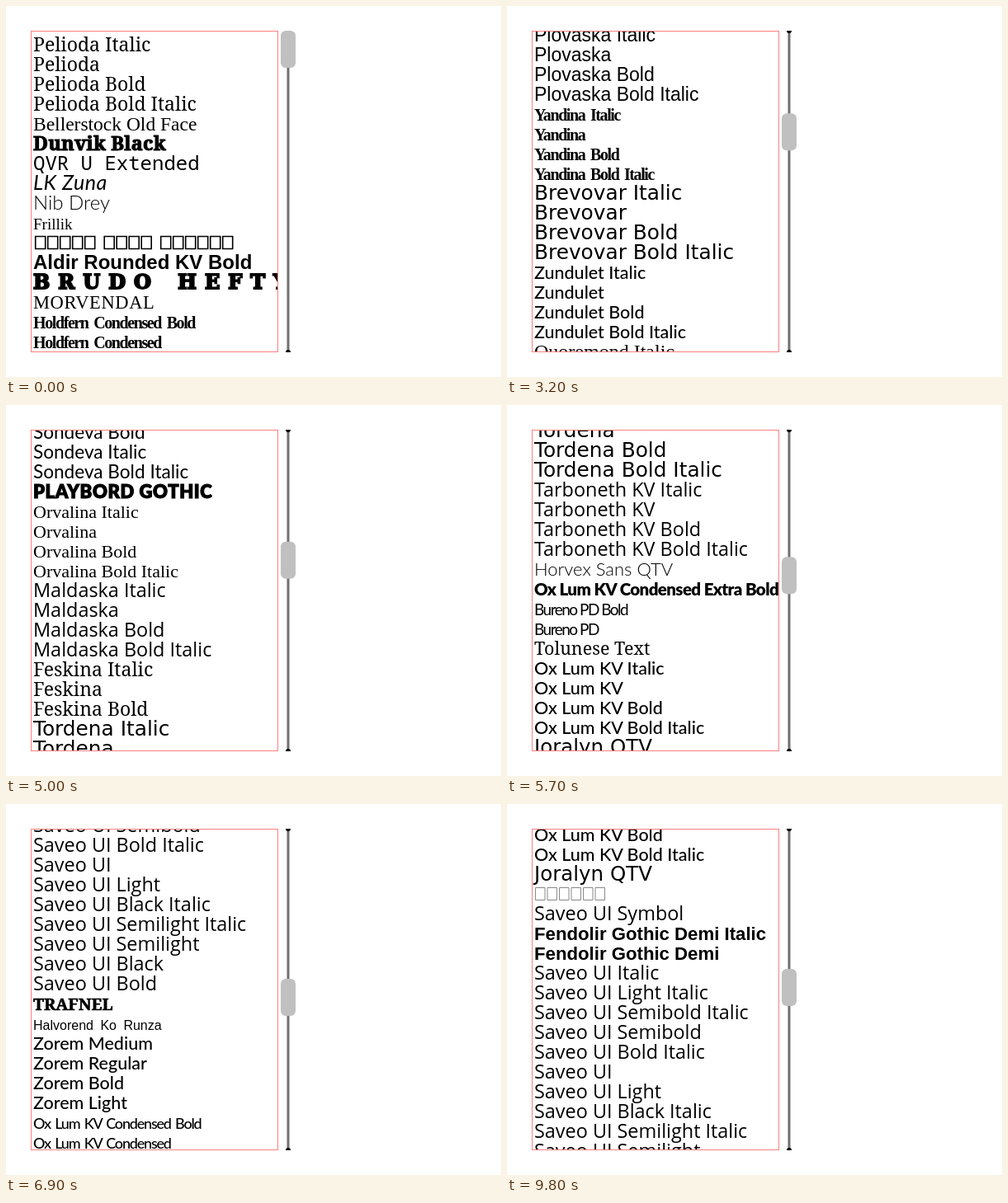
Recreate the animation shown at these times as an HTML page. Size 600 px wide and 450 px high, loop 10 s.

```html
<!DOCTYPE html>
<html lang="en">
<head>
<meta charset="utf-8">
<title>Font list</title>
<style>
html, body { margin: 0; width: 100%; height: 100%; overflow: hidden; background: #fff; }
svg { display: block; }
</style>
</head>
<body>
<svg width="600" height="450" viewBox="0 0 600 450">
  <clipPath id="view"><rect x="30" y="30" width="300" height="390"/></clipPath>
  <clipPath id="rail"><rect x="333" y="30" width="18" height="390"/></clipPath>
  <g clip-path="url(#view)"><g id="list"></g></g>
  <rect x="30.5" y="30.5" width="299" height="389" fill="none" stroke="#ff8080"/>
  <g clip-path="url(#rail)">
    <path d="M342 30V420" stroke="#707070" stroke-width="3"/>
    <circle cx="342" cy="30" r="3"/>
    <circle cx="342" cy="420" r="3"/>
  </g>
  <rect id="thumb" x="333" y="30" width="18" height="45" rx="6" fill="#c0c0c0"/>
</svg>
<script>
const LOOP = 10000, STEP = 100, ROW = 24, THUMB_RATIO = 20.95;
const list = document.getElementById('list');
const thumb = document.getElementById('thumb');
const SERIF = '"Liberation Serif",serif', SLAB = '"Noto Serif",serif', WIDE = '"DejaVu Serif",serif';
const SANS = '"Liberation Sans",sans-serif', HUMAN = '"Open Sans",sans-serif';
const ROUND = 'Lato,sans-serif', BROAD = '"DejaVu Sans",sans-serif';
const MONO = '"Liberation Mono",monospace', TYPE = '"DejaVu Sans Mono",monospace';
const OPTIC = '"Noto Sans Mono",monospace';

let count = 0;
const baseline = () => 54.5 + ROW * count++;

function append(tag, attrs, text = '') {
  const node = document.createElementNS('http://www.w3.org/2000/svg', tag);
  for (const key in attrs) node.setAttribute(key, attrs[key]);
  node.textContent = text;
  list.append(node);
}

// One row per comma-separated suffix;
// face = [family, size, weight/slant, letter spacing, word spacing, outline].
function add([family, size, look = '', spacing = 0, words = 0, outline = 0], name, suffixes = '') {
  for (const suffix of suffixes.split(','))
    append('text', {
      x: 33, y: baseline(), stroke: outline ? '#000' : 'none', 'stroke-width': outline,
      style: `font:${look} ${size}px ${family};letter-spacing:${spacing}px;word-spacing:${words}px`
    }, (name + ' ' + suffix).trim());
}

// A row of missing-glyph boxes, grouped in words.
function boxes(x, pitch, words, stroke, width) {
  const y = baseline() - 15;
  let d = '';
  for (const n of words) {
    for (let i = 0; i < n; i++, x += pitch) d += `M${x} ${y}h${pitch - 3}v15h${3 - pitch}z`;
    x += 8.5;
  }
  append('path', { d, fill: 'none', stroke, 'stroke-width': width });
}

const book = [SLAB, 23], times = [SERIF, 24], grotesk = [SANS, 24], gothic = [SANS, 23];
const demi = [SANS, 22.2, 'bold'], ui = [HUMAN, 23.4], humane = [ROUND, 22.6], geo = [ROUND, 21.5, 500];
const pen = [ROUND, 25, 'italic', 2.5], verd = [BROAD, 24.8], old = [SERIF, 23.5], typed = [TYPE, 24];
const narrow = [ROUND, 18, 500, -1.2, 2], slabNarrow = [SERIF, 20, 'bold', -1.4, 3];

// Further families for the stretches that pass by while scrolling.
const heads = ['Brev', 'Zund', 'Quor', 'Mald', 'Fesk', 'Threl', 'Plov', 'Yand'];
const tails = ['ina', 'ovar', 'ulet', 'emond', 'aska'];
const faces = [times, ui, book, humane, old, gothic, slabNarrow, verd, geo];
let family = 0;
function fill(rows) {
  for (let i = 0; i < rows; i++) {
    if (i % 4 == 0) family++;
    add(faces[family % 9], heads[family % 8] + tails[family % 5],
      ['Italic', '', 'Bold', 'Bold Italic'][i % 4]);
  }
}

add(book, 'Pelioda', 'Italic,,Bold,Bold Italic');
add(old, 'Bellerstock Old Face');
add([SLAB, 23.5, 900, 0.2, 0, 1], 'Dunvik Black');
add([OPTIC, 24], 'QVR U Extended');
add([ROUND, 25, 'italic', 0.6], 'LK Zuna');
add([ROUND, 24, 300], 'Nib Drey');
add([SERIF, 19], 'Frillik');
boxes(35.7, 15, [5, 4, 6], '#000', 1.6);
add([SANS, 24, 'bold'], 'Aldir Rounded KV Bold');
add([WIDE, 24, 'bold', 10, 4, 2], 'BRUDO HEFTY');
add([SERIF, 22.5, '', 0.6], 'MORVENDAL');
add(slabNarrow, 'Holdfern Condensed', 'Bold,');
fill(16);
add(times, 'Femsi New Monra', 'Italic,,Bold,Bold Italic');
add(gothic, 'Fendolir Gothic Book', 'Italic,');
add([SERIF, 21, 'italic'], 'Offhandy Tamor');
add([ROUND, 19, '', -2], 'Plumb QTV');
add([ROUND, 22, '300 italic', 1.2], 'Tolmsey Hand QTV');
add([SERIF, 25], 'Farrowdane');
add(old, 'Doramund', ',Bold,Italic');
add(grotesk, 'Aldir', 'Narrow Bold,Italic,Narrow,Narrow Italic,Bold Italic,');
fill(55);
add([SERIF, 16, 'bold', -1.5], 'Nerila Handwriting Italic');
add(typed, 'Nerila Sans Typewriter', 'Oblique,,Bold,Bold Oblique');
add([MONO, 24], 'Postrel New', 'Italic,,Bold,Bold Italic');
add(humane, 'Sondeva', ',Light,Light Italic,Bold,Italic,Bold Italic');
add([ROUND, 22, 900, 0.6, 0, 1], 'PLAYBORD GOTHIC');
add([SERIF, 22], 'Orvalina', 'Italic,,Bold,Bold Italic');
fill(7);
add(verd, 'Tordena', 'Italic,,Bold,Bold Italic');
add(ui, 'Tarboneth KV', 'Italic,,Bold,Bold Italic');
add([ROUND, 22, 300], 'Horvex Sans QTV');
add([ROUND, 20.5, 900, -0.6], 'Ox Lum KV Condensed Extra Bold');
add([ROUND, 19, '', -1.5], 'Bureno PD', 'Bold,');
add([SLAB, 21.5], 'Tolunese Text');
add(geo, 'Ox Lum KV', 'Italic,,Bold,Bold Italic');
add([BROAD, 24.5], 'Joralyn QTV');
boxes(34.5, 14.5, [6], '#888', 1);
add(ui, 'Saveo UI', 'Symbol');
add(demi, 'Fendolir Gothic Demi', 'Italic,');
add(ui, 'Saveo UI', 'Italic,Light Italic,Semibold Italic,Semibold,Bold Italic,,Light,' +
  'Black Italic,Semilight Italic,Semilight,Black,Bold');
add([SLAB, 20, 900, 0, 0, 0.6], 'TRAFNEL');
add([SANS, 16, '', 0, 4], 'Halvorend Ko Runza');
add([ROUND, 21.5, 500], 'Zorem', 'Medium,Regular,Bold,Light');
add(narrow, 'Ox Lum KV Condensed', 'Bold,');
add([MONO, 20], 'KanLou-ExtR');
add(ui, 'Saveo UI', 'Historic');
add([ROUND, 22.5, 500], 'Ferl Sans KV', 'Italic,,Bold,Bold Italic');
add([SERIF, 16], 'Halvorend Karovant');
boxes(34.5, 12, [8], '#888', 1);
add(ui, 'Halvorend TulgoRa', 'Bold,');
add(pen, 'Saveo Script', 'Bold,');
add(pen, 'Saveo Print', 'Bold,');
fill(16);

// [time, scroll offset]: drags with pauses between them.
const drags = [
  [0, 0], [2600, 0], [2700, 832], [3200, 2100], [3400, 2100], [4000, 2558], [4300, 2680],
  [4700, 2680], [5700, 3232], [5800, 3260], [6000, 3260], [6900, 3813], [7100, 3920],
  [7200, 3920], [7500, 4170], [8300, 4170], [8400, 4127], [8800, 3880], [8900, 3880],
  [9500, 3562], [LOOP, 3562]
];

function scrollAt(t) {
  const i = drags.findIndex(([time]) => time > t);
  const [t0, a] = drags[i - 1], [t1, b] = drags[i];
  return a + (b - a) * (t - t0) / (t1 - t0);
}

function draw() {
  const t = Math.floor(performance.now() % LOOP / STEP) * STEP;
  const scroll = scrollAt(t);
  list.setAttribute('transform', `translate(0 ${-Math.round(scroll)})`);
  thumb.setAttribute('y', 30 + scroll / THUMB_RATIO);
  requestAnimationFrame(draw);
}
draw();
</script>
</body>
</html>
```
